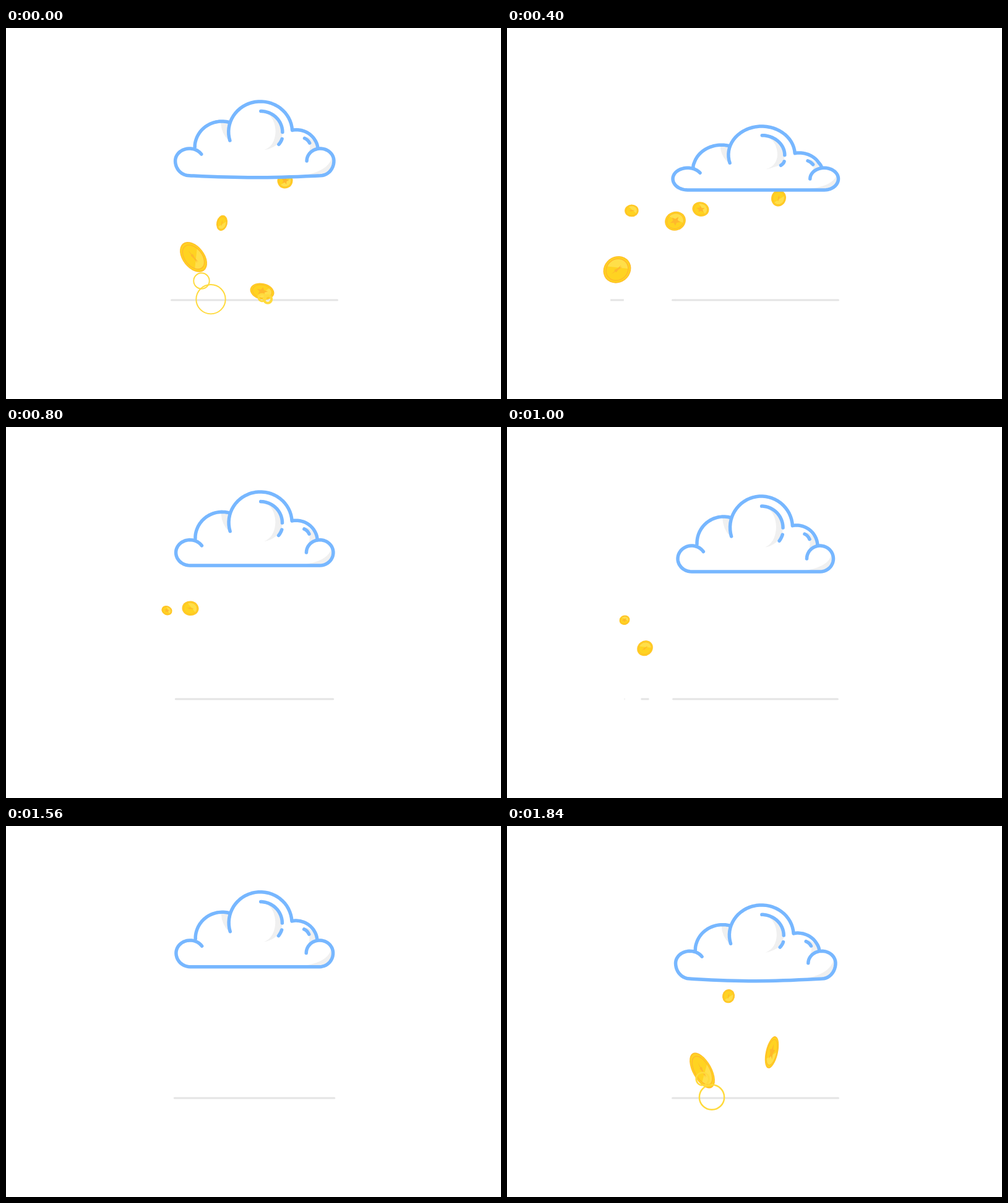
An HTML page with a canvas that plays this animation: 800x600 px, repeating every 1880 ms.

```html
<!DOCTYPE html>
<html lang="en">
<head>
<meta charset="utf-8">
<title>Coin cloud</title>
<style>
html, body { margin: 0; width: 100%; height: 100%; overflow: hidden; background: #fff; }
canvas { display: block; }
</style>
</head>
<body>
<canvas id="stage" width="800" height="600"></canvas>
<script>
const ctx = document.getElementById('stage').getContext('2d');
const STEP = 40, COUNT = 47;
const FLOOR = 440, MID = 401.5, HIT_Y = 426;
const BLUE = '#77b7ff', SHADE = '#f0f0f0', GREY = '#e4e4e4', RING = '#ffda3c';
const RAD = Math.PI / 180;
const clamp = (v, a, b) => Math.min(b, Math.max(a, v));

// Turning points of the bouncing cloud; the first repeats one loop later.
const LOW = { top: 174.7, edge: 290, half: 134.5 };
const TURNS = [
  { at: -5, ...LOW },
  { at: 5, top: 94, edge: 216, half: 125 },
  { at: 10, top: 159, edge: 262, half: 133.5 },
  { at: 19, top: 104.5, edge: 223.5, half: 127 },
  { at: 25, top: 112, edge: 234, half: 125.5 },
  { at: 37, top: 88.5, edge: 211, half: 124.5 },
  { at: 42, ...LOW }
];

// Rising slows towards the peak, falling speeds up.
function cloudAt(n) {
  if (n > 42) n -= COUNT;
  const i = TURNS.findIndex(k => k.at >= n && k.at > -5);
  const a = TURNS[i - 1], b = TURNS[i], u = (n - a.at) / (b.at - a.at);
  const e = b.top < a.top ? 1 - (1 - u) ** 1.7 : u ** 1.7;
  const mix = key => a[key] + (b[key] - a[key]) * e;
  return { top: mix('top'), edge: mix('edge'), half: mix('half') };
}

// hit: step of the bounce, x: where, lead/pace: leftward speed before/after it
const coins = [
  { hit: -2, x: 328, lead: 16, pace: 12.5, r: 24, apex: 326, thin: true, puff: [-15, -30] },
  { hit: 0, x: 414, lead: 14, pace: 14.2, r: 17.5, puff: [-9, -3] },
  { hit: 2, x: 331, lead: 9, pace: 16.2, r: 11.5, thin: true, puff: [-12, -10] },
  { hit: 4, x: 403, lead: 12, pace: 15, r: 13.7, puff: [-14, -7] },
  { hit: 13, x: 403, lead: 12, pace: 15, r: 13.7, thin: true, puff: [-14, -7] },
  { hit: 15, x: 330, lead: 12, pace: 14, r: 8.8 }
];

const coinX = (c, p) => c.x - p * (p < 0 ? c.lead : c.pace);

function coinY(c, p) {
  if (p <= 0) return HIT_Y - 192 * (1 - ((p + 5) / 5) ** 1.68);
  const apex = c.apex || 293, d = p - 6;
  return d < 0 ? apex + (HIT_Y - apex) * (d / 6) ** 2 : apex + .3 * d ** 3;
}

// Width to length: thin in flight, flat on impact, rounder while rising.
function coinRatio(p) {
  if (p < 0) return 1 - .63 * ((p + 5) / 4) ** 2.5;
  return p === 0 ? 1.5 : .9 - .42 * Math.exp((1 - p) / 2.2);
}

function ellipse(rx, ry) {
  ctx.beginPath();
  ctx.ellipse(0, 0, rx, ry, 0, 0, Math.PI * 2);
}

function star(r, flat) {
  ctx.beginPath();
  for (let i = 0; i < 10; i++) {
    const a = i * Math.PI / 5, q = i % 2 ? r * .45 : r;
    ctx.lineTo(Math.sin(a) * q * flat, -Math.cos(a) * q);
  }
  ctx.fill();
}

function drawCoin(c, p) {
  const x = coinX(c, p), y = coinY(c, p);
  const ratio = coinRatio(p), ry = c.r * .92 / Math.sqrt(ratio), rx = ry * ratio;
  const w = Math.min(34.7 - .265 * (FLOOR - y), c.r * 2);
  if (p > 3 && y < FLOOR && w > 0) {
    ctx.fillStyle = GREY;
    ctx.fillRect(x - w / 2, FLOOR - 1.5, w, 3);
  }
  ctx.save();
  ctx.beginPath();
  ctx.rect(0, 0, 800, FLOOR + .5);
  ctx.clip();
  ctx.translate(x, y);
  ctx.rotate((p <= 0 ? 13 : -20 - 9 * p) * RAD);
  ctx.fillStyle = '#ffbd2a';
  ellipse(rx, ry);
  ctx.fill();
  ctx.fillStyle = '#ffd321';
  ellipse(rx * .94, ry * .94);
  ctx.fill();
  ctx.save();
  ellipse(rx * .8, ry * .8);
  ctx.clip();
  ctx.rotate(-.8);
  ctx.fillStyle = '#ffdf49';
  ctx.fillRect(-ry, ry * .15, ry * 2, ry);
  ctx.restore();
  ctx.strokeStyle = '#ffb82a';
  ctx.lineWidth = Math.max(.8, c.r * .06);
  ellipse(rx * .8, ry * .8);
  ctx.stroke();
  ctx.fillStyle = '#ffb82c';
  star(ry * .52, ratio * (c.thin ? .25 : .95));
  ctx.restore();
}

function ring(x, y, r, width, alpha) {
  ctx.globalAlpha = alpha;
  ctx.strokeStyle = RING;
  ctx.lineWidth = width;
  ctx.beginPath();
  ctx.arc(x, y, r, 0, Math.PI * 2);
  ctx.stroke();
  ctx.globalAlpha = 1;
}

function drawRings(c, p) {
  if (p < 0 || p > 4) return;
  const x = c.x + (c.hit === 0 ? 9 : 3);
  ring(x, 438.7, c.r * (1.05 - .7 * Math.exp(-1.2 * p)),
    1.6 + 2.4 * Math.exp(-p), p > 3 ? .5 : 1);
  if (c.puff && p < 4) {
    ring(x + c.puff[0], 439 + c.puff[1], c.r * (.33 + .1 * p), 3.2 - .65 * p, p > 2 ? .35 : 1);
  }
}

function drawCloud({ top, edge, half }, sag) {
  // The wider the cloud, the flatter its ball and, even more, its lobes.
  const wide = half / 125.5;
  const ball = 1 - 1.35 * (wide - 1), lobe = 1 - 2.5 * (wide - 1);
  const px = x => MID + (x - MID) * wide;
  const py = y => {
    const d = y - 112;
    if (d < 64.5) return top + d * ball;
    if (d < 79) return top + d * (ball + (lobe - ball) * (d - 64.5) / 14.5);
    if (d < 101) return top + d * lobe;
    const mid = top + 101 * lobe;
    return mid + (edge - mid) * (d - 101) / 21;
  };
  const to = (x, y) => ctx.lineTo(px(x), py(y));
  const curve = (a, b, c, d) => ctx.quadraticCurveTo(px(a), py(b), px(c), py(d));
  const arc = (cx, cy, rx, ry, from, end) => {
    for (let i = 0; i <= 32; i++) {
      const a = (from + (end - from) * i / 32) * RAD;
      to(cx + rx * Math.cos(a), cy + ry * Math.sin(a));
    }
  };
  const belly = () => {
    ctx.lineTo(px(506), edge);
    ctx.bezierCurveTo(px(470), edge + sag * .55, px(445), edge + sag, px(MID), edge + sag);
    ctx.bezierCurveTo(px(358), edge + sag, px(333), edge + sag * .55, px(298.5), edge);
  };
  const leftPuff = () => arc(350, 188, 43, 43, 178, 286);
  const ballArc = () => {
    arc(411, 162.5, 50.5, 50.5, 163.5, 357);
    arc(468, 193, 34, 34, -101, -2);
  };
  const shape = (style, build) => {
    ctx.beginPath();
    build();
    ctx.fillStyle = style;
    ctx.fill();
  };
  const line = build => {
    ctx.beginPath();
    build();
    ctx.stroke();
  };

  shape('#fff', () => {
    arc(298.5, 213, 22.5, 21, 90, 270);
    leftPuff();
    ballArc();
    arc(506, 213, 21.5, 21, -90, 90);
    belly();
  });

  shape(SHADE, () => {
    arc(411, 163, 35, 32, -70, 80);
    curve(434, 187, 435, 162);
    curve(434, 141, 423, 133);
  });
  shape(SHADE, () => {
    to(348, 146); to(363, 147); to(360.5, 160); to(361, 177);
    curve(349, 166, 348, 146);
  });
  shape(SHADE, () => {
    to(484, 170);
    curve(499, 176, 502, 191);
    to(488, 198);
    curve(493, 184, 484, 170);
  });
  shape(SHADE, () => {
    arc(506, 213, 21.5, 21, -25, 90);
    ctx.lineTo(px(465), edge + sag * .6);
    curve(522, 230, 525, 203);
  });

  ctx.strokeStyle = BLUE;
  ctx.lineWidth = 5.5;
  ctx.lineCap = ctx.lineJoin = 'round';
  line(() => {
    arc(506, 213, 21.5, 21, -180, 90);
    belly();
    arc(298.5, 213, 22.5, 21, 90, 327);
  });
  line(leftPuff);
  line(ballArc);
  line(() => arc(411, 163, 35, 35, -89, 0));
  line(() => arc(411, 163, 36, 36, 18, 36));
  line(() => { to(481, 173); curve(486, 175, 489, 181.5); });
}

function draw(n) {
  ctx.fillStyle = '#fff';
  ctx.fillRect(0, 0, 800, 600);

  // The belly trails behind while the cloud rises.
  const cloud = cloudAt(n);
  const lift = cloudAt((n + COUNT - 1) % COUNT).edge - cloud.edge;
  const sag = clamp(2 * lift, 0, 3) + 2 * Math.max(0, lift - 9);

  const reach = 134 - clamp((236 - cloud.edge - sag) * .57, 0, 16);
  ctx.strokeStyle = GREY;
  ctx.lineWidth = 3;
  ctx.lineCap = 'round';
  ctx.beginPath();
  ctx.moveTo(MID - reach, FLOOR);
  ctx.lineTo(MID + reach, FLOOR);
  ctx.stroke();

  const live = coins.map(c => [c, (n - c.hit + 6 + COUNT) % COUNT - 6])
    .filter(([, p]) => p >= -5 && p <= 15);
  live.forEach(([c, p]) => drawCoin(c, p));
  live.forEach(([c, p]) => drawRings(c, p));
  drawCloud(cloud, sag);
}

const start = performance.now();
function tick() {
  const t = Math.max(0, performance.now() - start);
  draw(Math.floor(t / STEP) % COUNT);
  requestAnimationFrame(tick);
}
tick();
</script>
</body>
</html>
```
